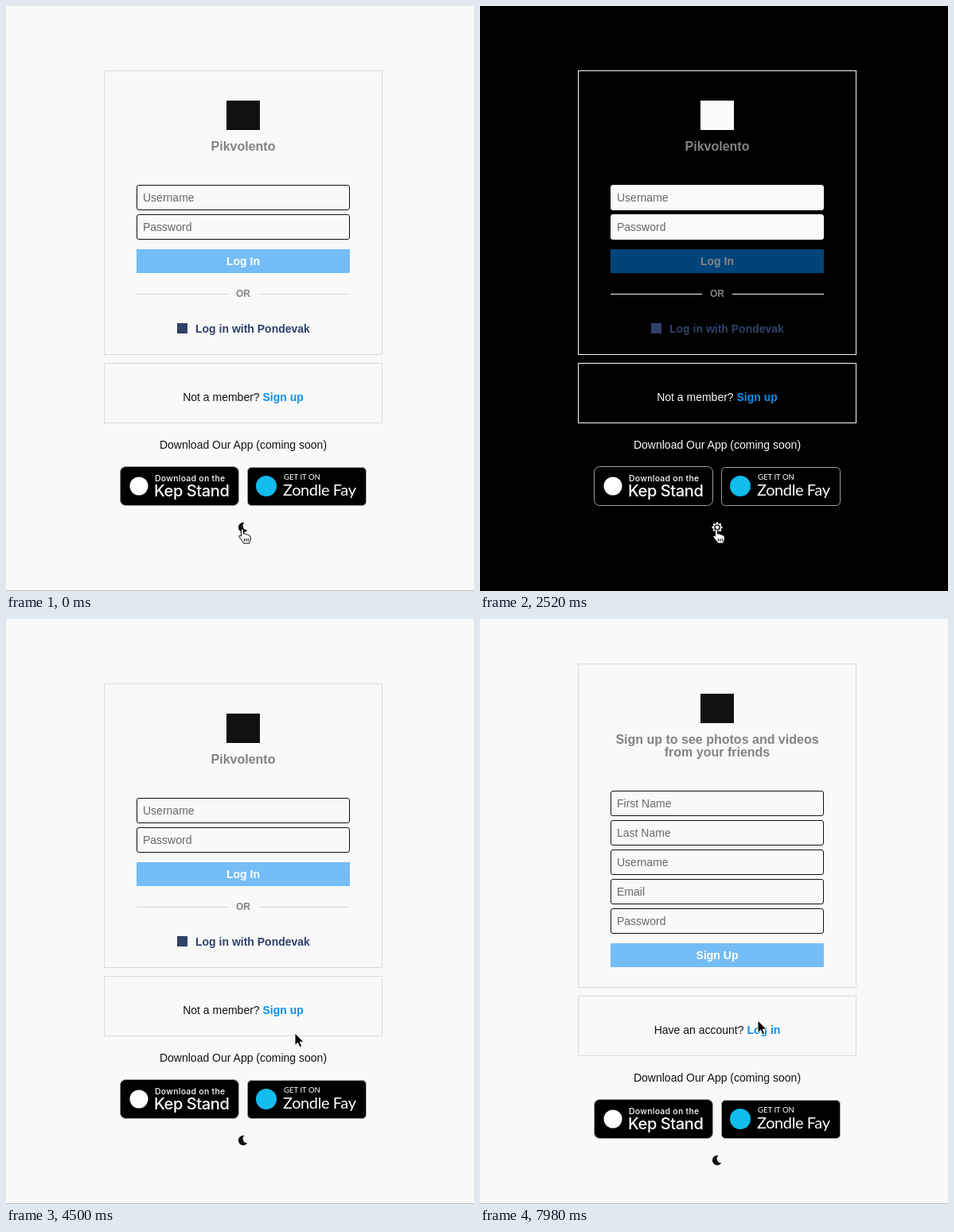
An HTML page for the animation above (8000 ms loop, 588 by 736 pixels).

```html
<!DOCTYPE html>
<html lang="en">
<head>
<meta charset="utf-8">
<title>Login demo</title>
<style>
  html, body { margin: 0; width: 100%; height: 100%; overflow: hidden; }
  svg { display: block; width: 588px; height: 736px; cursor: default;
    --bg: #f9f9f9; --ink: #111; --line: #dadada; --field: none; --edge: #111; --foot: #bdbdbd; }
  svg.dark { --bg: #000; --ink: #fafafa; --line: #fafafa; --field: #fafafa; --edge: #fafafa; --foot: #000; }
  text { font: 14px "Liberation Sans", Arial, sans-serif; fill: var(--ink); }
  .mid { text-anchor: middle; }
  .bold { font-weight: bold; }
  .title { font-size: 16px; fill: #838383; }
  .or { font-size: 12px; fill: #838383; }
  .hint { fill: #686868; }
  .alt { fill: #2f4168; }
  .link { fill: #0a90f0; font-weight: bold; }
  .button { fill: #0088f4; opacity: .53; }
  .label { fill: #fff; }
  .dark .button { opacity: .5; }
  .dark .label { fill: #848484; }
  .card { fill: none; stroke: var(--line); }
  .field { fill: var(--field); stroke: var(--edge); }
  .badge { fill: #000; stroke: #a0a0a0; }
  .badges text { fill: #fff; }
  .badges .a { font: 500 10.5px Inter, sans-serif; letter-spacing: .25px; }
  .badges .b { font: 500 20px Inter, sans-serif; letter-spacing: -.4px; }
  .badges .c { font: 9.6px Lato, sans-serif; }
  .badges .d { font: 20px Lato, sans-serif; letter-spacing: -.4px; }
  #cursor { pointer-events: none; }
</style>
</head>
<body>
<svg id="stage" viewBox="0 0 588 736">
  <rect width="588" height="736" fill="var(--bg)"/>
  <rect y="735" width="588" height="1" fill="var(--foot)"/>
  <g id="login"></g>
  <g id="signup"></g>
  <g id="footer">
    <text class="mid" x="298" y="557">Download Our App (coming soon)</text>
    <g class="badges">
      <rect class="badge" x="143.5" y="579.5" width="149" height="49" rx="7"/>
      <circle cx="167" cy="604" r="11.5" fill="#fff"/>
      <text class="a" x="187" y="598">Download on the</text>
      <text class="b" x="186" y="617">Kep Stand</text>
      <rect class="badge" x="303.5" y="580.5" width="149" height="48" rx="5"/>
      <circle cx="327" cy="604" r="13" fill="#12bcec"/>
      <text class="c" x="349" y="596">GET IT ON</text>
      <text class="d" x="348" y="616">Zondle Fay</text>
    </g>
    <path id="moon" fill="var(--ink)" d="M299.5 650A6.2 6.2 0 1 0 303.3 659.3A5.3 5.3 0 0 1 299.5 650Z"/>
    <g id="sun">
      <path id="rays" fill="var(--ink)"/>
      <circle cx="298" cy="656" r="3.1" fill="var(--ink)" stroke="#000" stroke-width="1.3"/>
    </g>
    <rect class="hit" x="291" y="649" width="14" height="15" fill="transparent"/>
  </g>
  <g id="cursor">
    <path id="arrow" stroke="#fff" stroke-linejoin="round"
      d="M0 0V15.5L3.6 12.2L6 17.8L8.7 16.6L6.3 11.2H11.2Z"/>
    <g id="hand" stroke="#000" stroke-linejoin="round">
      <path fill="#fff" d="M-1.6 1.5a1.6 1.6 0 0 1 3.2 0V6.2c2-.9 3 .1 3 .8 1.6-.6 2.7.2 2.8 1 1.6-.4 2.8.4 2.8 2V13c0 2-1.6 2.5-1.6 5H1.6C1 15.5-2.5 13-4 9.8c-.7-1.6 1-2.4 2.4-.6z"/>
      <path fill="none" d="M2.4 12v3.5M4.8 12v3.5M7.2 12v3.5"/>
    </g>
  </g>
</svg>
<script>
const LOOP = 8000, DARK_ON = 560, DARK_OFF = 2540, SIGNUP = 6300;
const $ = id => document.getElementById(id);

const text = (x, y, cls, s) => `<text class="${cls}" x="${x}" y="${y}">${s}</text>`;
const centered = (y, cls, s) => text(298, y, 'mid ' + cls, s);
const card = (y, h) => `<rect class="card" x="123.5" y="${y + .5}" width="349" height="${h}"/>`;
const fields = (y, names) => names.map((s, i) => {
  const top = y + 37 * i;
  return `<rect class="field" x="164.5" y="${top + .5}" width="267" height="31" rx="2.5"/>` +
    text(172, top + 21, 'hint', s);
}).join('');
const button = (y, s) =>
  `<g class="hit"><rect class="button" x="164" y="${y}" width="268" height="30"/>` +
  centered(y + 20, 'bold label', s) + '</g>';
const mark = y => `<rect x="277" y="${y}" width="42" height="37" fill="var(--ink)"/>`;
const prompt = (y, s, link) =>
  card(y, 75) + centered(y + 48, '', `${s} <tspan class="link hit">${link}</tspan>`);
const rule = x => `<path d="M${x} 362.5h115" stroke="var(--line)"/>`;

$('login').innerHTML = card(81, 357) + mark(119) +
  centered(182, 'bold title', 'Pikvolento') +
  fields(225, ['Username', 'Password']) + button(306, 'Log In') +
  rule(164) + centered(366, 'bold or', 'OR') + rule(317) +
  '<rect class="alt" x="215" y="399" width="13" height="13"/>' +
  text(238, 411, 'bold alt hit', 'Log in with Pondevak') +
  prompt(449, 'Not a member?', 'Sign up');

$('signup').innerHTML = card(56, 407) + mark(94) +
  centered(157, 'bold title', 'Sign up to see photos and videos') +
  centered(173, 'bold title', 'from your friends') +
  fields(216, ['First Name', 'Last Name', 'Username', 'Email', 'Password']) +
  button(408, 'Sign Up') + prompt(474, 'Have an account?', 'Log in');

// Eight-pointed sun
$('rays').setAttribute('d', 'M' + Array.from({ length: 16 }, (_, i) => {
  const r = i % 2 ? 5 : 7.2, a = i * Math.PI / 8;
  return `${(298 + r * Math.cos(a)).toFixed(1)} ${(656 + r * Math.sin(a)).toFixed(1)}`;
}).join('L') + 'Z');

// Pointer stops; a tour circles the whole form on the way to its stop
const toggle = { x: 297, y: 658 };
const stops = [
  { t: 0, ...toggle },
  { t: 580, ...toggle },
  { t: 1120, x: 424, y: 500 },
  { t: 1560, x: 285, y: 412 },
  { t: 2400, x: 290, y: 470 },
  { t: 2520, ...toggle },
  { t: 3920, ...toggle },
  { t: 4500, x: 362, y: 522 },
  { t: 6100, x: 355, y: 493, tour: true },
  { t: SIGNUP, x: 355, y: 493 },
  { t: 7980, x: 349, y: 505, tour: true },
  { t: LOOP, x: 349, y: 505 }
];

function recorded(t) {
  const rest = t % 140;
  return t - rest + (rest < 20 ? 0 : rest < 120 ? 1 : 2) * 140 / 3;
}

function pointer(t) {
  const i = stops.findIndex(s => s.t > t);
  const a = stops[i - 1], b = stops[i];
  const k = (t - a.t) / (b.t - a.t), ease = k * k * (3 - 2 * k);
  let x = a.x + (b.x - a.x) * ease, y = a.y + (b.y - a.y) * ease;
  if (b.tour) {
    const turn = 2 * Math.PI * ease, back = 1 - Math.cos(turn), side = Math.sin(turn);
    x += 130 * side - 70 * back;
    y -= 120 * side + 185 * back;
  }
  return [Math.round(x), Math.round(y)];
}

const show = (id, on) => $(id).setAttribute('display', on ? 'inline' : 'none');

function draw(t) {
  const dark = t >= DARK_ON && t < DARK_OFF, signup = t >= SIGNUP;
  const [x, y] = pointer(recorded(t));
  $('stage').setAttribute('class', dark ? 'dark' : '');
  show('login', !signup);
  show('signup', signup);
  show('moon', !dark);
  show('sun', dark);
  $('footer').setAttribute('transform', `translate(0 ${signup ? 25 : 0})`);
  $('cursor').setAttribute('transform', `translate(${x} ${y})`);
  const under = document.elementFromPoint(x, y);
  const hover = Boolean(under && under.closest('.hit'));
  show('hand', hover);
  show('arrow', !hover);
}

function tick() {
  draw(performance.now() % LOOP);
  requestAnimationFrame(tick);
}
tick();
</script>
</body>
</html>
```
